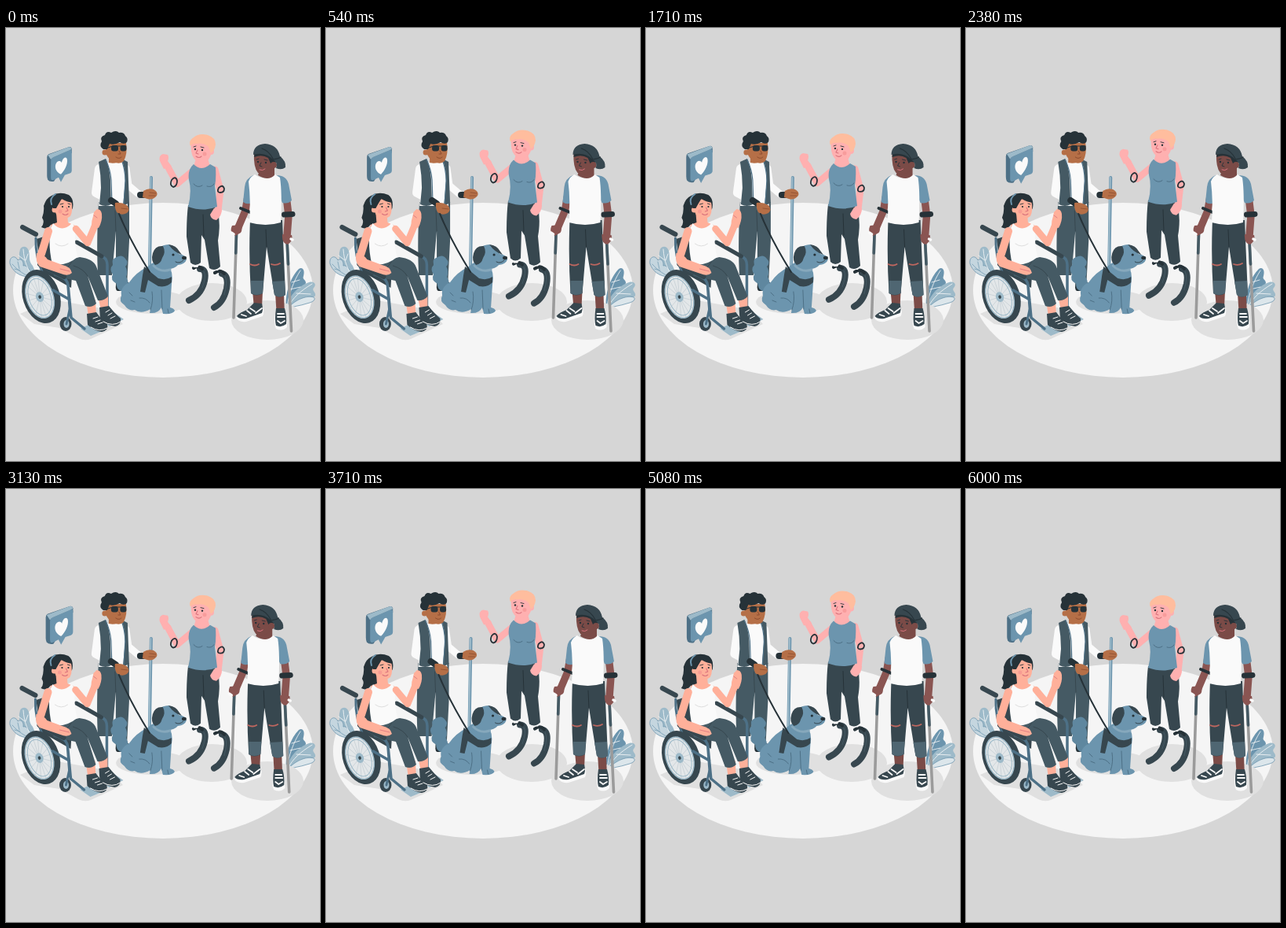
An HTML page that plays this animation: 400 px wide and 550 px high, repeating every 6.04 s.

```html
<!DOCTYPE html>
<html lang="en">
<head>
<meta charset="utf-8">
<title>Group of friends</title>
<style>
html, body { margin: 0; width: 100%; height: 100%; overflow: hidden; background: #d6d6d6; }
svg { display: block; width: 100vw; height: 100vh; }
.line { fill: none; stroke-linecap: round; stroke-linejoin: round; }
.ink { fill: #263238; } .dark { fill: #37474f; } .slate { fill: #455a64; }
.blue { fill: #6c95ae; } .deep { fill: #4d7086; } .pale { fill: #9dbac9; }
.white { fill: #fafafa; } .pink { fill: #ffb09a; } .rose { fill: #f28f8f; }
.fair { fill: #ffb0b0; } .tan { fill: #b56f47; } .brown { fill: #7b4b47; } .shade { fill: #e0e0e0; }
.sInk { stroke: #263238; } .sDark { stroke: #37474f; } .sSlate { stroke: #455a64; }
.sBlue { stroke: #6c95ae; } .sDeep { stroke: #4d7086; } .sPale { stroke: #9dbac9; }
.sWhite { stroke: #fafafa; } .sPink { stroke: #ffb09a; } .sFair { stroke: #ffb0b0; }
.sBrown { stroke: #8a5552; } .sGray { stroke: #9b9b9b; } .sRose { stroke: #d9737d; }
</style>
</head>
<body>
<svg viewBox="0 0 400 550" preserveAspectRatio="none">
<rect width="400" height="550" fill="#d6d6d6"/>
<ellipse cx="200" cy="333" rx="191" ry="111" fill="#f5f5f5"/>

<!-- plants -->
<g>
  <path class="pale" d="M34 318C20 307 14 294 18 281C21 276 27 277 29 283C31 291 28 295 34 302C37 308 38 313 37 318Z"/>
  <path fill="#c5d6df" class="sBlue" stroke-width=".8" d="M30 316C16 316 8 308 5 299C4 290 12 288 15 295C18 292 23 295 22 302C26 300 33 309 34 318Z"/>
  <path class="line sWhite" stroke-width=".8" d="M22 281C23 297 28 308 35 316M16 289L24 295M28 287L25 295"/>
  <path class="line sBlue" stroke-width=".7" d="M8 300C15 308 24 314 33 317M11 306L18 308M15 297L17 306"/>
  <path class="blue" d="M357 356C355 340 361 318 373 306C378 303 381 308 379 315C377 320 382 319 382 324C380 328 373 331 370 339Z"/>
  <path class="pale" d="M358 356C359 341 372 328 386 323C393 321 396 326 392 330C389 334 395 335 394 340C391 345 381 342 371 349Z"/>
  <path fill="#dce6eb" class="sBlue" stroke-width=".8" d="M358 357C367 346 382 339 392 342C396 346 388 349 383 350C375 353 366 353 358 357Z"/>
  <path class="line sWhite" stroke-width=".8" d="M375 308C366 322 360 339 358 354M390 325C375 334 365 343 359 355M364 323L374 320M362 332L375 329M370 337L388 338"/>
</g>

<g class="shade">
  <path d="M18 363L60 345L132 358L149 376L108 395Q100 398 92 394L68 381L36 376Z"/>
  <ellipse cx="186" cy="348" rx="46" ry="15"/>
  <ellipse cx="262" cy="348" rx="45" ry="24"/>
  <ellipse cx="333" cy="371" rx="46" ry="25"/>
</g>

<g id="bubble">
  <path class="deep" d="M54 160L80 151Q83 150 84 153L84 158L61 195Q55 196 53 193Q52 191 52 188V164Q52 161 54 160Z"/>
  <path class="blue" d="M60 164L81 155Q84 154 84 157V181Q84 184 81 185L75 187L70 196L67 190L61 193Q57 195 57 190V169Q57 165 60 164Z"/>
  <path class="pale" d="M53 161L80 151Q83 150 84 154Q83 154 81 155L60 164Q58 165 57 167Z"/>
  <path class="white" d="M70 186C65 184 62 179 63 174C64 169 69 167 71 171C72 165 77 162 78 167C79 173 75 181 70 186Z"/>
</g>

<g id="walker">
  <!-- legs and shoes -->
  <path class="ink" d="M141 323H156Q159 332 151 334H142Q138 332 141 323Z"/>
  <path class="slate" d="M118 221H157L157 270L154 327Q147 330 140 327L140 258L135 314H117Q115 270 118 221Z"/>
  <path class="line sDark" stroke-width="1" d="M140 258L139 232"/>
  <!-- neck, shirt, vest -->
  <path class="tan" d="M131 160H145V174Q138 179 131 173Z"/>
  <path class="white" d="M125 169Q137 175 148 168L155 226H118Z"/>
  <path class="line sWhite" stroke-width="12" d="M119 179L115 209L136 220"/>
  <path class="line sWhite" stroke-width="9" d="M153 178L156 200L169 211"/>
  <path class="slate" d="M127 166L118 170Q121 187 121 203L119 224Q127 228 134 224L133 193Q132 177 127 166Z"/>
  <path class="slate" d="M147 166L155 170L157 222L149 226L152 194Q152 178 147 166Z"/>
  <path class="line sDeep" stroke-width="1.2" d="M127 167Q133 180 134 193L135 223M147 167Q152 180 152 194L150 225"/>
  <!-- head -->
  <path class="tan" d="M127 146H153Q155 160 150 169Q145 174 137 170Q129 166 127 158Z"/>
  <circle class="tan" cx="126" cy="158" r="3.5"/>
  <path class="ink" d="M124 154Q118 150 122 144Q119 138 126 136Q128 130 134 133Q140 129 144 133Q150 132 152 137Q157 141 153 146Q149 148 145 145Q138 149 132 147L129 154Z"/>
  <path class="line sInk" stroke-width="1.2" d="M127 153L136 150H153"/>
  <rect class="ink" x="134" y="149" width="9" height="7.5" rx="3"/><rect class="ink" x="145.500" y="149" width="8" height="7.500" rx="3"/>
  <path class="line" stroke="#8c4d30" stroke-width="1" d="M144 156L146 160H143M140 164Q144 167 147 164"/>
  <!-- cane -->
  <path class="line sBlue" stroke-width="4" d="M185 190L183 302"/>
  <path class="line sPale" stroke-width="2" d="M184.5 190L182.5 302"/>
  <!-- hands -->
  <path class="line sInk" stroke-width="8" stroke-linecap="butt" d="M134 219L140 223M171 212H176"/>
  <path class="tan" d="M139 222Q147 221 154 225Q159 231 154 235Q147 239 141 234Q138 228 139 222ZM175 207Q181 203 188 205Q194 208 192 213Q187 219 180 217L174 215Z"/>
  <path class="line" stroke="#8c4d30" stroke-width=".8" d="M147 229L155 230M183 209L191 210M182 213L190 213"/>
  <!-- dog -->
  <path fill="#5f879f" d="M152 335Q140 334 141 325Q132 320 136 313Q131 306 136 301Q134 293 141 291Q148 287 152 293Q157 298 152 303Q156 309 153 316Q159 326 152 335Z"/>
  <path class="blue" d="M181 303Q166 310 157 323Q145 329 147 340Q143 347 151 352Q156 360 164 358Q172 364 184 357L183 362Q194 363 198 355L200 363Q213 364 215 359Q214 356 209 355L211 325Q214 310 206 300Q190 293 181 303Z"/>
  <path class="line sDeep" stroke-width="1" d="M198 333L199 357M183 349Q178 342 170 343M186 335Q188 347 184 358M157 336L161 340M159 346L164 348M206 357L207 362"/>
  <path class="dark" d="M176 303Q184 310 194 318Q204 321 211 316L211 323Q205 330 194 328L181 320L177 336L171 335L174 314Z"/>
  <path class="blue" d="M190 290Q192 276 207 275Q218 277 220 287Q229 288 230 294Q228 300 219 301Q214 307 204 306Q192 304 190 290Z"/>
  <path class="line" stroke="#86a8bc" stroke-width="3" d="M188 302Q197 311 209 307"/>
  <path class="dark" d="M200 277Q190 276 187 286Q184 296 190 301Q197 300 199 292Q204 285 200 277ZM207 275Q217 276 221 284L224 288Q214 285 207 275Z"/>
  <ellipse class="ink" cx="227" cy="292" rx="3" ry="2.2"/><circle class="ink" cx="213" cy="288" r="1.6"/>
  <path class="line sInk" stroke-width=".8" d="M226 295Q221 300 216 297"/>
  <path class="line sInk" stroke-width="2" d="M144 236Q158 270 183 310"/>
</g>

<g id="runner">
  <!-- blades -->
  <path class="line sDark" stroke-width="8" d="M247 306Q256 306 253 321Q249 339 233 346M275 312Q284 314 281 331Q277 349 265 355"/>
  <path class="line sInk" stroke-width="4" d="M239 305Q245 301 250 306M266 311Q273 306 278 312"/>
  <path class="line sSlate" stroke-width="1" d="M252 309Q256 315 250 330M279 315Q283 322 278 339"/>
  <path class="white" d="M236 299L246 301L244 304H239ZM262 304L273 303L270 308L264 308Z"/>
  <!-- trousers -->
  <path class="dark" d="M232 225H269Q274 249 270 270L273 303Q266 310 259 305L253 269L249 263L248 298Q241 304 235 298L230 265Q230 242 232 225Z"/>
  <path class="line sInk" stroke-width="1" d="M252 264L251 237"/>
  <!-- arms -->
  <path class="line sFair" stroke-width="8.5" d="M236 183L218 198L206 176"/>
  <path class="fair" d="M201 179L196 169Q194 162 200 160L206 161Q208 164 206 169L211 176Z"/>
  <path class="line sFair" stroke-width="9" d="M266 180L273 206L270 232"/>
  <path class="fair" d="M265 229L275 230Q275 239 268 244Q261 243 260 237Z"/>
  <!-- torso -->
  <path class="fair" d="M243 162H256L260 176Q251 183 239 176Z"/>
  <path class="blue" d="M239 173Q249 183 260 173L267 177Q268 191 266 201L269 227Q252 234 232 227Q237 208 233 193Q231 180 239 173Z"/>
  <path class="line sDeep" stroke-width="1" d="M239 198Q244 204 250 200M256 201Q262 203 265 198"/>
  <!-- head -->
  <path class="fair" d="M236 145H261Q265 157 258 167Q251 173 243 169Q234 163 236 145Z"/>
  <circle class="fair" cx="261" cy="157" r="4"/>
  <path fill="#ffbd9e" d="M235 150Q232 143 239 139Q246 133 257 136Q267 139 267 148Q266 156 261 159L258 151Q252 145 243 147Q238 146 235 150Z"/>
  <circle class="ink" cx="241" cy="154" r="1.2"/><circle class="ink" cx="250" cy="155" r="1.2"/>
  <path class="line sInk" stroke-width=".9" d="M239 151L242 150M248 151L252 152"/>
  <path class="line sRose" stroke-width="1.1" d="M244 155L242 159L245 160M242 163Q246 166 249 163"/>
  <circle class="rose" cx="253" cy="160" r="2.5" opacity=".6"/>
  <path class="line sInk" stroke-width="1.8" d="M211 193Q216 187 218 194Q218 201 213 202Q208 200 211 193ZM271 203Q276 198 278 204Q278 209 273 209Q268 209 271 203Z"/>
</g>

<g id="walker2">
  <path class="line sGray" stroke-width="3.6" d="M293.5 262L290 368M358 270L363.5 385"/>
  <path class="line sSlate" stroke-width="3.6" d="M293.5 262L292.700 286M358 270L359.5 300"/>
  <!-- shoes -->
  <path class="brown" d="M314 334H327L326 355H316ZM343 337H354L355 367H345Z"/>
  <path class="white" d="M316 350L326 351Q330 360 327 366L306 373Q296 374 293 368Q296 361 307 358ZM344 358H355Q359 368 358 380Q352 386 344 382Q340 374 344 358Z"/>
  <path class="dark" d="M316 349L326 350Q328 357 326 362L306 369Q297 370 294 366Q298 361 307 358ZM344 356H355Q358 366 357 376Q351 381 344 378Q342 370 344 356Z"/>
  <path class="line sWhite" stroke-width="1.8" d="M307 359L312 363M311 356L317 360M318 362L326 356M300 364L306 366M346 363H354M346 367H355M346 372L350 375L355 372"/>
  <!-- trousers -->
  <path class="dark" d="M311 244H352L356 339Q348 344 342 339L332 278L327 337Q319 342 312 337Q309 290 311 244Z"/>
  <path fill="#4f6672" d="M312 321H328L327 337Q319 341 312 337ZM339 322L355 321L356 339Q348 344 342 339Z"/>
  <path class="line sInk" stroke-width="1" d="M332 278L331 256"/>
  <path class="line" stroke="#bd665f" stroke-width="1.8" d="M311 300Q317 303 322 300M338 300Q344 302 349 299"/>
  <!-- arms -->
  <path class="line sBrown" stroke-width="9.5" d="M308 214L305 232L296 253M357 214L360 238L358 264"/>
  <path fill="#8a5552" d="M288 251L299 250Q302 255 299 260L292 264Q284 260 288 251ZM352 262L364 263Q366 270 359 275Q351 274 352 262Z"/>
  <path class="line sWhite" stroke-width="3.500" d="M287 260L290 262M363 268L365 269"/>
  <path class="line sInk" stroke-width="4" stroke-linecap="butt" d="M299 229L311 234"/>
  <path class="line sInk" stroke-width="7" stroke-linecap="butt" d="M354.500 237L365 236.500"/>
  <!-- shirt -->
  <path class="blue" d="M315 187Q305 191 304 202L302 221Q307 225 313 222L318 203ZM344 187Q357 187 360 198L364 219Q359 224 352 222L345 205Z"/>
  <path class="white" d="M317 186Q329 195 343 186L349 190Q352 210 350 247Q331 253 310 247Q312 220 309 195Q311 189 317 186Z"/>
  <!-- head -->
  <path class="brown" d="M325 175H342V187Q334 195 321 187Z"/>
  <path class="brown" d="M316 158H341Q345 173 339 181Q329 189 321 184Q315 177 316 158Z"/>
  <path class="ink" d="M316 164L317 157H342L344 172L337 172L334 165Q326 160 316 164Z"/>
  <circle class="brown" cx="341" cy="174" r="4"/>
  <path class="dark" d="M315 161Q315 148 330 147Q346 148 349 163Q357 169 356 177Q351 181 344 178Q347 171 340 167Q330 157 315 161Z"/>
  <path class="line sInk" stroke-width="1.2" d="M340 167Q347 166 350 164M326 153Q335 156 340 166"/>
  <circle class="ink" cx="321" cy="170" r="1.2"/><circle class="ink" cx="331" cy="171" r="1.2"/>
  <path class="line sInk" stroke-width=".9" d="M319 167L322 166M329 167L333 168M325 171L323 175L326 176"/>
  <path class="line sRose" stroke-width="1" d="M323 180Q327 182 330 179"/>
</g>

<g id="chair">
  <!-- far side of the chair -->
  <path class="line sDeep" stroke-width="3.500" d="M91 272L124 291Q129 294 129 301V354"/>
  <path class="line sDark" stroke-width="5" d="M90 272L122 290"/>
  <path class="line sDark" stroke-width="6" stroke-linecap="butt" d="M21 253L38 262"/>
  <path class="dark" d="M39 268L57 262L85 299L83 330L44 308Z"/>
  <path class="line sDeep" stroke-width="3" d="M38 267Q37 290 47 312"/>
  <!-- legs -->
  <path class="pink" d="M117 340H130L130 359H121ZM102 345H114L115 367H105Z"/>
  <path class="pale" d="M95 382L111 374L125 384L108 391ZM117 370L137 361L150 370L132 379Z"/>
  <path class="dark" d="M119 355L131 353Q139 363 146 369Q147 377 139 379Q128 377 120 370Z"/>
  <path class="dark" d="M103 363L115 361Q121 370 129 376Q131 384 122 386Q111 384 104 377Z"/>
  <path class="line sWhite" stroke-width="1" d="M111 369L117 367M114 373L120 371M117 376L123 374M127 361L132 358M130 365L135 362M133 369L139 366M108 380Q119 387 129 381M124 373Q136 380 146 373"/>
  <path class="slate" d="M59 300L94 291Q111 293 115 303L130 341Q125 347 117 346L104 315L115 350Q109 356 101 353L89 321L61 315Z"/>
  <path class="line sDark" stroke-width="1" d="M86 302Q99 306 104 315M84 297L77 306"/>
  <!-- wheel -->
  <g transform="rotate(-18 45 341)">
    <ellipse class="dark" cx="45" cy="341" rx="23.5" ry="35"/>
    <ellipse class="sPale" fill="#e3e7e9" stroke-width="1.500" cx="43" cy="341" rx="17" ry="27.500"/>
    <path class="line" stroke="#b8c4ca" stroke-width=".5" d="M43 314V368M27 341H59M31 321L55 361M55 321L31 361M37 315L49 367M49 315L37 367M27 331L59 351M59 331L27 351"/>
    <ellipse class="line sPale" stroke-width="1" cx="43" cy="341" rx="14" ry="24"/>
    <ellipse class="pale" cx="43" cy="341" rx="5" ry="6.500"/>
    <ellipse class="dark" cx="43" cy="341" rx="1.800" ry="2.300"/>
  </g>
  <!-- near side of the chair -->
  <path class="line sDeep" stroke-width="3.500" d="M43 301L72 317Q78 319 79 327L82 365M60 333L81 345M79 326L83 368L100 382"/>
  <path class="line sDark" stroke-width="6" d="M43 300L74 316"/>
  <ellipse class="dark" cx="76" cy="376" rx="7.5" ry="9"/>
  <ellipse class="pale" cx="77" cy="376" rx="3.5" ry="5"/>
  <path class="line sDeep" stroke-width="3" d="M81 358L77 376"/>
  <!-- hair, torso, arms -->
  <path class="ink" d="M58 213Q68 207 80 212Q87 217 85 229L72 247Q65 253 57 250Q52 257 45 253Q50 247 46 241Q49 233 48 226Q51 216 58 213Z"/>
  <path class="pink" d="M64 235H78L79 247L88 251L83 261L58 260L57 250L65 247Z"/>
  <path class="white" d="M60 248Q71 261 84 248L89 254Q86 271 91 291Q77 303 59 300Q54 280 56 257Z"/>
  <path class="line" stroke="#dedede" stroke-width="1" d="M63 274Q71 280 79 274"/>
  <path class="line sPink" stroke-width="10" d="M54 258L45 287"/>
  <path class="pink" d="M39 286Q47 286 53 294L72 301Q82 303 84 311Q79 316 70 312L43 303Q37 297 39 286Z"/>
  <path class="line sPink" stroke-width="8.500" d="M89 255L104 273L114 249"/>
  <path class="pink" d="M109 251Q109 244 111 239L112 234L116 230Q121 230 122 236Q123 245 118 254Z"/>
  <path class="line sRose" stroke-width=".8" d="M112 238L116 241M69 306L81 309"/>
  <!-- head -->
  <path class="pink" d="M63 221Q72 214 83 219Q86 231 82 239Q75 245 67 240Q60 235 63 221Z"/>
  <circle class="pink" cx="62" cy="231" r="3.5"/>
  <path class="ink" d="M60 229Q56 214 68 211Q82 210 85 222Q77 221 71 217Q66 225 64 229Z"/>
  <path class="line sBlue" stroke-width="2" d="M58 224Q55 216 63 211"/>
  <circle class="ink" cx="72" cy="227" r="1.1"/><circle class="ink" cx="80" cy="227" r="1.1"/>
  <path class="line sInk" stroke-width=".9" d="M69 224L73 223M79 223L82 224"/>
  <path class="line sRose" stroke-width="1.1" d="M77 228L79 232L76 233M72 236Q76 239 79 236"/>
  <circle class="rose" cx="69" cy="233" r="2.5" opacity=".6"/>
</g>
</svg>
<script>
const LOOP = 6040;
const part = id => document.getElementById(id);
const [bubble, walker, runner, walker2, chair] =
  ['bubble', 'walker', 'runner', 'walker2', 'chair'].map(part);
const move = (el, x, y = 0) =>
  el.setAttribute('transform', `translate(${x.toFixed(2)} ${y.toFixed(2)})`);

function draw(ms) {
  const turn = (ms % LOOP) / LOOP * 2 * Math.PI;
  const wave = cycles => Math.cos(cycles * turn);
  const size = 1.035 - 0.05 * wave(1);
  bubble.setAttribute('transform',
    `translate(68 174) scale(${size.toFixed(4)}) translate(-68 -174)`);
  move(walker, 1.3 * (wave(3) - wave(5)));
  move(runner, 0, 3.3 * (wave(4) - 1));
  move(walker2, 1.6 * (wave(5) - wave(4)));
  move(chair, 0.3 * (wave(5) - 1));
}

const start = performance.now();
function tick() {
  draw(performance.now() - start);
  requestAnimationFrame(tick);
}
tick();
</script>
</body>
</html>
```
